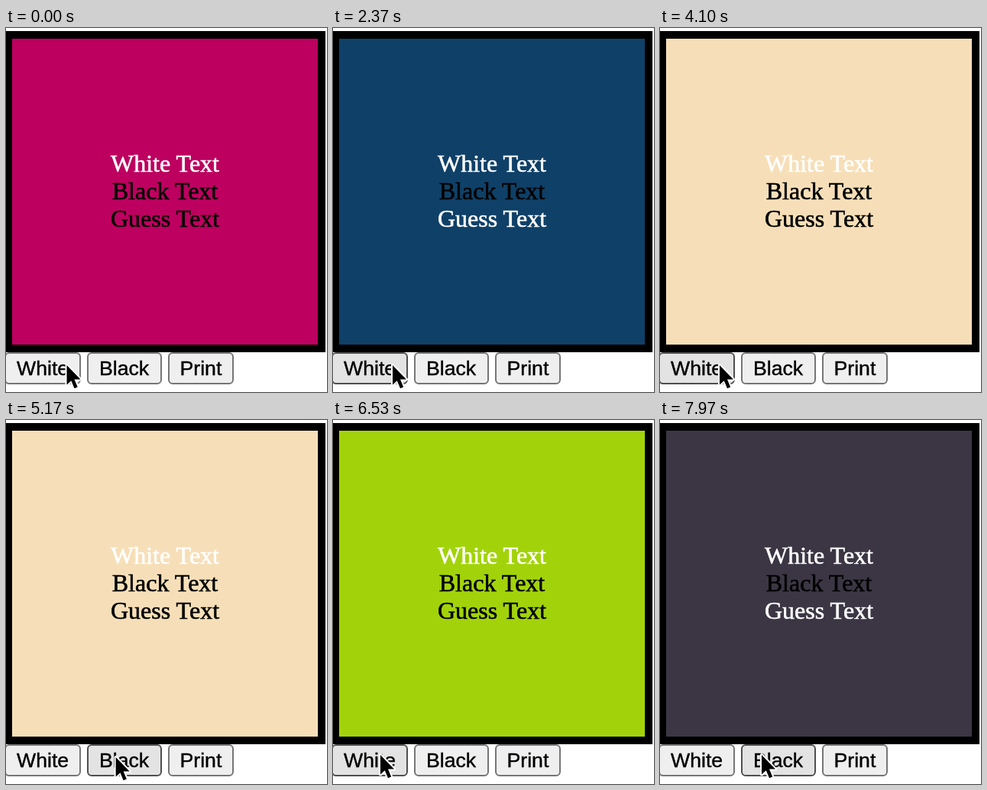
Recreate the animation shown at these times as an HTML page. Size 420 by 476 pixels, loop 8000 ms.

```html
<!DOCTYPE html>
<html lang="en">
<head>
<meta charset="utf-8">
<title>Text colour picker</title>
<style>
  html, body { margin: 0; width: 100%; height: 100%; overflow: hidden; background: #fff; }
  svg { display: block; width: 420px; height: 476px; }
  text { fill: currentColor; stroke: currentColor; stroke-width: .6; }
  .panel text { font: 32px "Liberation Serif", "Times New Roman", serif; text-anchor: middle; }
  .button text { font: 26.667px "Liberation Sans", Arial, sans-serif; stroke-width: .4; }
  .button rect { stroke-width: 2; }
</style>
</head>
<body>
<svg viewBox="0 0 420 476">
  <g class="panel">
    <rect x="-2" y="4" width="420" height="420"/>
    <rect id="fill" x="8" y="14" width="400" height="400"/>
    <text x="208" y="188" color="#fff">White Text</text>
    <text x="208" y="224">Black Text</text>
    <text id="guess" x="208" y="260">Guess Text</text>
  </g>
  <g class="button"><rect x="-1" y="425" width="98" height="40" rx="5"/><text x="14" y="454">White</text></g>
  <g class="button"><rect x="107" y="425" width="96" height="40" rx="5"/><text x="122" y="454">Black</text></g>
  <g class="button"><rect x="213" y="425" width="84" height="40" rx="5"/><text x="227.5" y="454">Print</text></g>
  <path id="cursor" d="M0 0V25.5L5.8 20.2L10 30.2L14.2 28.4L10 18.6H18Z"
        stroke="#fff" stroke-width="4" stroke-linejoin="round" paint-order="stroke"/>
</svg>
<script>
const LOOP = 8000;

// time, panel colour, guessed text colour
const rounds = [
  [0, '#bd005f', '#000'],
  [2000, '#0f4067', '#fff'],
  [2930, '#5a4670', '#fff'],
  [4000, '#f6dfb8', '#000'],
  [5430, '#1b838c', '#000'],
  [6480, '#a2d30a', '#000'],
  [7800, '#3c3644', '#fff']
];

// press start, press end
const presses = [[0, 2000], [2830, 2930], [3930, 4000], [5330, 5430], [6400, 6480], [7700, 7800]];

// time, cursor x, cursor y
const path = [
  [0, 79.5, 441], [30, 79.5, 441], [70, 78, 441], [4730, 78, 441],
  [5250, 148, 441], [5980, 148, 441], [6320, 62, 438],
  [7300, 62, 438], [7530, 133, 438], [LOOP, 133, 438]
];

const looks = {
  idle: ['#efefef', '#767676'],
  hover: ['#e3e3e3', '#4f4f4f'],
  down: ['#efefef', '#767676']
};

const get = id => document.getElementById(id);
const fill = get('fill'), guess = get('guess'), cursor = get('cursor');
const buttons = [...document.querySelectorAll('.button rect')];
const ease = u => u * u * (3 - 2 * u);

function cursorAt(t) {
  const i = path.findIndex(p => p[0] > t);
  const [t0, x0, y0] = path[i - 1], [t1, x1, y1] = path[i];
  const u = ease((t - t0) / (t1 - t0));
  return [x0 + (x1 - x0) * u, y0 + (y1 - y0) * u];
}

function draw(t) {
  const [, colour, ink] = rounds.filter(r => r[0] <= t).pop();
  fill.setAttribute('fill', colour);
  guess.setAttribute('color', ink);

  const [x, y] = cursorAt(t);
  cursor.setAttribute('transform', `translate(${x} ${y})`);

  const pressed = presses.some(([a, b]) => t >= a && t < b);
  for (const b of buttons) {
    const left = b.x.baseVal.value - 1, right = left + b.width.baseVal.value + 2;
    const over = x >= left && x <= right;
    const [face, edge] = looks[over ? (pressed ? 'down' : 'hover') : 'idle'];
    b.setAttribute('fill', face);
    b.setAttribute('stroke', edge);
  }
}

const start = performance.now();
function tick() {
  draw((performance.now() - start) % LOOP);
  requestAnimationFrame(tick);
}
tick();
</script>
</body>
</html>
```
